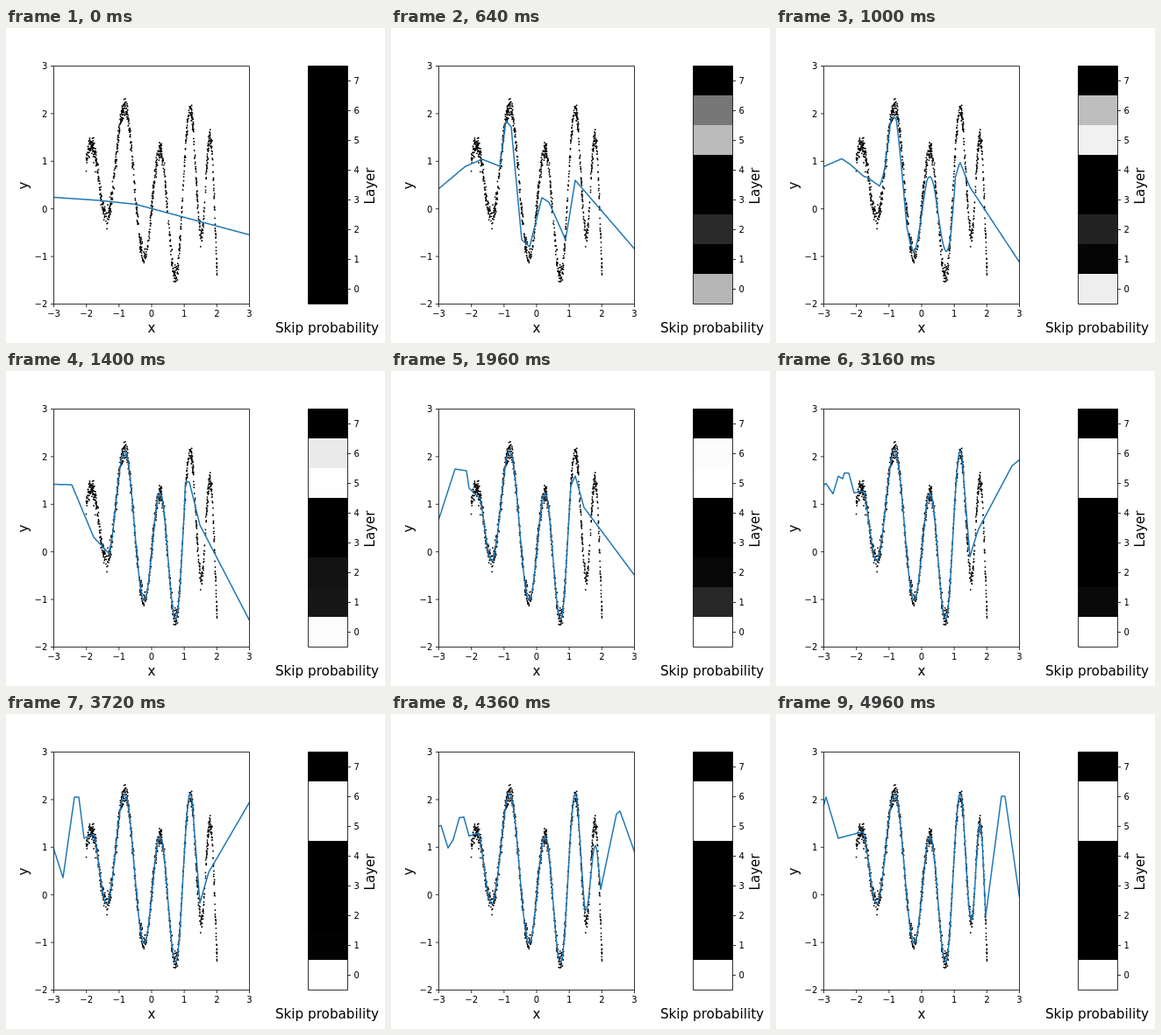
An HTML page for the animation above (5000 ms loop, 432 px wide and 360 px high).

```html
<!DOCTYPE html>
<html lang="en">
<head>
<meta charset="utf-8">
<title>Curve fit with layer skipping</title>
<style>
html, body { margin: 0; width: 100%; height: 100%; overflow: hidden; background: #fff; }
svg { display: block; width: 432px; height: 360px; font-family: "DejaVu Sans", sans-serif; }
</style>
</head>
<body>
<svg id="stage" viewBox="0 0 432 360" xmlns="http://www.w3.org/2000/svg"></svg>
<script>
const LOOP = 5000;
const box = { l: 54.5, r: 277.5, t: 43.5, b: 315.5 };
const bar = { l: 344.5, r: 389.5, rows: 8 };
const rowH = (box.b - box.t) / bar.rows;
const stage = document.getElementById("stage");

function add(tag, attrs, parent = stage) {
  const el = document.createElementNS("http://www.w3.org/2000/svg", tag);
  for (const k in attrs) el.setAttribute(k, attrs[k]);
  parent.appendChild(el);
  return el;
}

function label(text, x, y, size, anchor, turn) {
  const attrs = { x, y, "font-size": size, "text-anchor": anchor };
  if (turn) attrs.transform = `rotate(-90 ${x} ${y})`;
  add("text", attrs).textContent = text;
}

const stroke = d => add("path", { d, fill: "none", stroke: "#000", "stroke-width": 0.8 });
const frame = (l, r) => stroke(`M${l} ${box.t}H${r}V${box.b}H${l}Z`);
const signed = n => String(n).replace("-", "\u2212");
const straight = u => u;
const cosine = u => (1 - Math.cos(Math.PI * u)) / 2;

// Height at x of a chain of points joined by the given easing
function heightAt(pts, x, ease) {
  let i = 1;
  while (i < pts.length - 1 && x > pts[i][0]) i++;
  const [x0, y0] = pts[i - 1], [x1, y1] = pts[i];
  return y0 + (y1 - y0) * ease((x - x0) / (x1 - x0));
}

const turns = [[85.6, 172], [97.5, 133], [114.7, 217], [135.2, 92], [157.5, 262], [175.7, 140],
  [193.4, 284], [210, 91], [222.6, 236], [232.7, 125], [243.8, 315]];
const signal = x => heightAt(turns, x, cosine);

// At each stage the curve follows the signal over "fit" and is straight outside it
const stages = [
  { at: 0, head: [[54, 193.5], [106, 197], [148, 201.5]], tail: [[278, 236.5]] },
  { at: 13, head: [[54, 184], [85, 158], [104, 150], [124, 158], [131, 106], [137, 113], [149, 242]],
    tail: [[158, 250], [172, 194], [180, 199], [199, 242], [210, 174], [278, 253]] },
  { at: 28, head: [[54, 129.5], [75, 130], [100, 190]], fit: [118, 203],
    tail: [[204.5, 127], [209, 127], [221, 176], [278, 286]] },
  { at: 39, head: [[54, 171], [73, 112], [86, 114], [89, 134]], fit: [102, 205],
    tail: [[210, 120], [220, 156], [278, 234]] },
  { at: 53, head: [[54, 110], [57, 98], [71, 98], [76, 136]], fit: [100, 212],
    tail: [[221, 209], [229, 184], [269, 102], [278, 102]] },
  { at: 74, head: [[54, 153], [65, 187], [78, 95], [83, 95], [89, 142]], fit: [100, 213],
    tail: [[221, 216], [231, 181], [278, 100]] },
  { at: 99, head: [[54, 106], [57, 95], [71, 142]], fit: [99, 235],
    tail: [[239, 231], [257, 94], [261, 94], [278, 213]] }
];

const xs = Array.from({ length: 448 }, (_, i) => 54 + i / 2);

for (const s of stages) {
  const pts = [...s.head];
  if (s.fit) for (let x = s.fit[0]; x <= s.fit[1]; x++) pts.push([x, signal(x)]);
  pts.push(...s.tail);
  s.ys = xs.map(x => heightAt(pts, x, straight));
}

// Skip probability by layer: some open up, some flare briefly, the rest stay shut
const opening = tau => step => 1 - Math.exp(-Math.pow(step / tau, 1.8));
const flare = (size, peak, power) => step =>
  size * Math.pow(step / peak * Math.exp(1 - step / peak), power);
const skip = { 0: opening(11.5), 1: flare(0.155, 39, 11), 2: flare(0.165, 13, 2),
  5: opening(11.1), 6: opening(16.8) };

let seed = 11;
function rand() {
  seed = (seed * 1664525 + 1013904223) % 4294967296;
  return (seed + 1) / 4294967297;
}
const gauss = () => Math.sqrt(-2 * Math.log(rand())) * Math.cos(2 * Math.PI * rand());

function scatter(count) {
  let d = "";
  for (let i = 0; i < count; i++) {
    const x = 91.5 + 149 * rand();
    d += `M${x.toFixed(1)} ${(signal(x) + 5.4 * gauss()).toFixed(1)}h0`;
  }
  add("path", { d, fill: "none", stroke: "#000", "stroke-width": 1.8, "stroke-linecap": "round" });
}

add("rect", { width: 432, height: 360, fill: "#fff" });
scatter(1100);
const clip = add("clipPath", { id: "plot" });
add("rect", { x: box.l, y: box.t, width: box.r - box.l, height: box.b - box.t }, clip);
const curve = add("path", { fill: "none", stroke: "#1f77b4", "stroke-width": 1.5,
  "stroke-linejoin": "round", "clip-path": "url(#plot)" });
frame(box.l, box.r);

for (let v = -3; v <= 3; v++) {
  const x = box.l + (v + 3) * (box.r - box.l) / 6;
  stroke(`M${x} ${box.b}v3.5`);
  label(signed(v), x, 330, 10, "middle");
}
for (let v = -2; v <= 3; v++) {
  const y = box.b - (v + 2) * (box.b - box.t) / 5;
  stroke(`M${box.l} ${y}h-3.5`);
  label(signed(v), 47.3, y + 3.8, 10, "end");
}

const cells = [];
for (let layer = 0; layer < bar.rows; layer++) {
  const y = box.b - (layer + 1) * rowH;
  cells.push(add("rect", { x: bar.l, y: y - 0.5, width: bar.r - bar.l, height: rowH }));
  stroke(`M${bar.r} ${y + rowH / 2}h3.5`);
  label(layer, 396.5, y + rowH / 2 + 3.8, 10, "start");
}
frame(bar.l, bar.r);

label("x", 166, 348, 15, "middle");
label("y", 24.5, 180, 15, "middle", true);
label("Skip probability", 366, 348, 15.2, "middle");
label("Layer", 419.5, 180.5, 15, "middle", true);

// 100 training steps, four to every 200 ms, on a 40 ms clock
function stepAt(ms) {
  return Math.floor(ms / 200) * 4 + [0, 1, 1, 2, 3][Math.floor(ms % 200 / 40)];
}

function draw(step) {
  let i = 1;
  while (i < stages.length - 1 && step > stages[i].at) i++;
  const a = stages[i - 1], b = stages[i];
  const k = (step - a.at) / (b.at - a.at);
  curve.setAttribute("d", "M" + xs.map((x, n) =>
    x + " " + (a.ys[n] + (b.ys[n] - a.ys[n]) * k).toFixed(2)).join("L"));
  cells.forEach((cell, layer) => {
    const g = skip[layer] ? Math.round(255 * skip[layer](step)) : 0;
    cell.setAttribute("fill", `rgb(${g},${g},${g})`);
  });
}

const start = performance.now();
let shown = -1;
function tick() {
  const step = stepAt(Math.max(0, performance.now() - start) % LOOP);
  if (step !== shown) draw(shown = step);
  requestAnimationFrame(tick);
}
tick();
</script>
</body>
</html>
```
